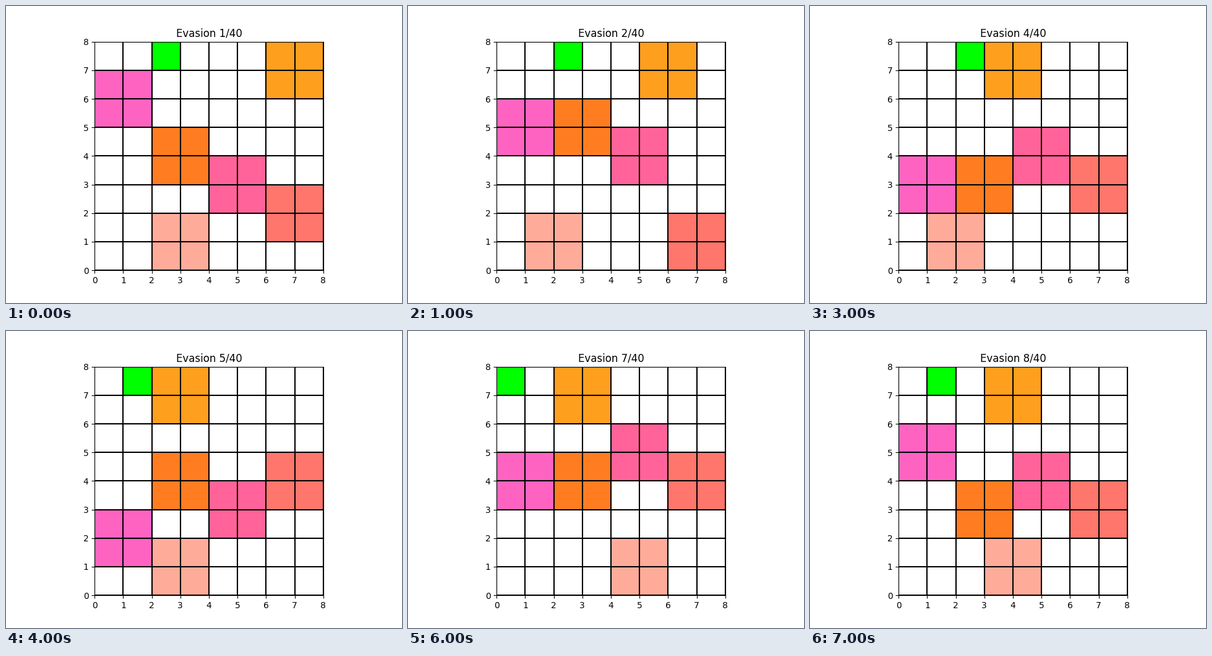
A matplotlib script for the animation above (8000 ms loop, 640 by 480 pixels).

```python
import matplotlib.pyplot as plt
from matplotlib.animation import FuncAnimation
from matplotlib.patches import Rectangle

SIZE = 8
STEPS = 8
TOTAL = 40
AGENT_COLOR = "#00ff00"
AGENT_COLUMNS = [2, 2, 2, 2, 1, 0, 0, 1]

# colour, axis of travel, fixed coordinate, lowest, highest, start, direction
BLOCKS = [
    ("#ff9f1e", "x", 6, 1, 6, 6, -1),
    ("#ff63c1", "y", 0, 1, 6, 5, -1),
    ("#ff7d20", "y", 2, 2, 4, 3, 1),
    ("#ff639a", "y", 4, 2, 4, 2, 1),
    ("#ff766c", "y", 6, 0, 4, 1, -1),
    ("#ffab9a", "x", 0, 0, 4, 2, -1),
]


def bounce(step, low, high, start, direction):
    """Position after moving one cell per step between two limits."""
    span = high - low
    offset = start - low
    phase = offset if direction > 0 else 2 * span - offset
    return low + span - abs((phase + step) % (2 * span) - span)


def add_square(side, color):
    return ax.add_patch(Rectangle((0, 0), side, side, facecolor=color,
                                  linewidth=0))


fig, ax = plt.subplots(figsize=(6.4, 4.8), dpi=100)
ax.set_xlim(0, SIZE)
ax.set_ylim(0, SIZE)
ax.set_aspect("equal")
ax.set_xticks(range(SIZE + 1))
ax.set_yticks(range(SIZE + 1))
ax.set_axisbelow(False)
ax.grid(color="black", linewidth=1.5)
title = ax.set_title("")

squares = [add_square(2, block[0]) for block in BLOCKS]
agent = add_square(1, AGENT_COLOR)


def draw(step):
    for square, (_, axis, fixed, *path) in zip(squares, BLOCKS):
        moving = bounce(step, *path)
        square.set_xy((moving, fixed) if axis == "x" else (fixed, moving))
    agent.set_xy((AGENT_COLUMNS[step], SIZE - 1))
    title.set_text(f"Evasion {step + 1}/{TOTAL}")
    return [title, agent, *squares]


anim = FuncAnimation(fig, draw, frames=STEPS, interval=1000,
                     repeat=True, repeat_delay=0)
plt.show()
```
